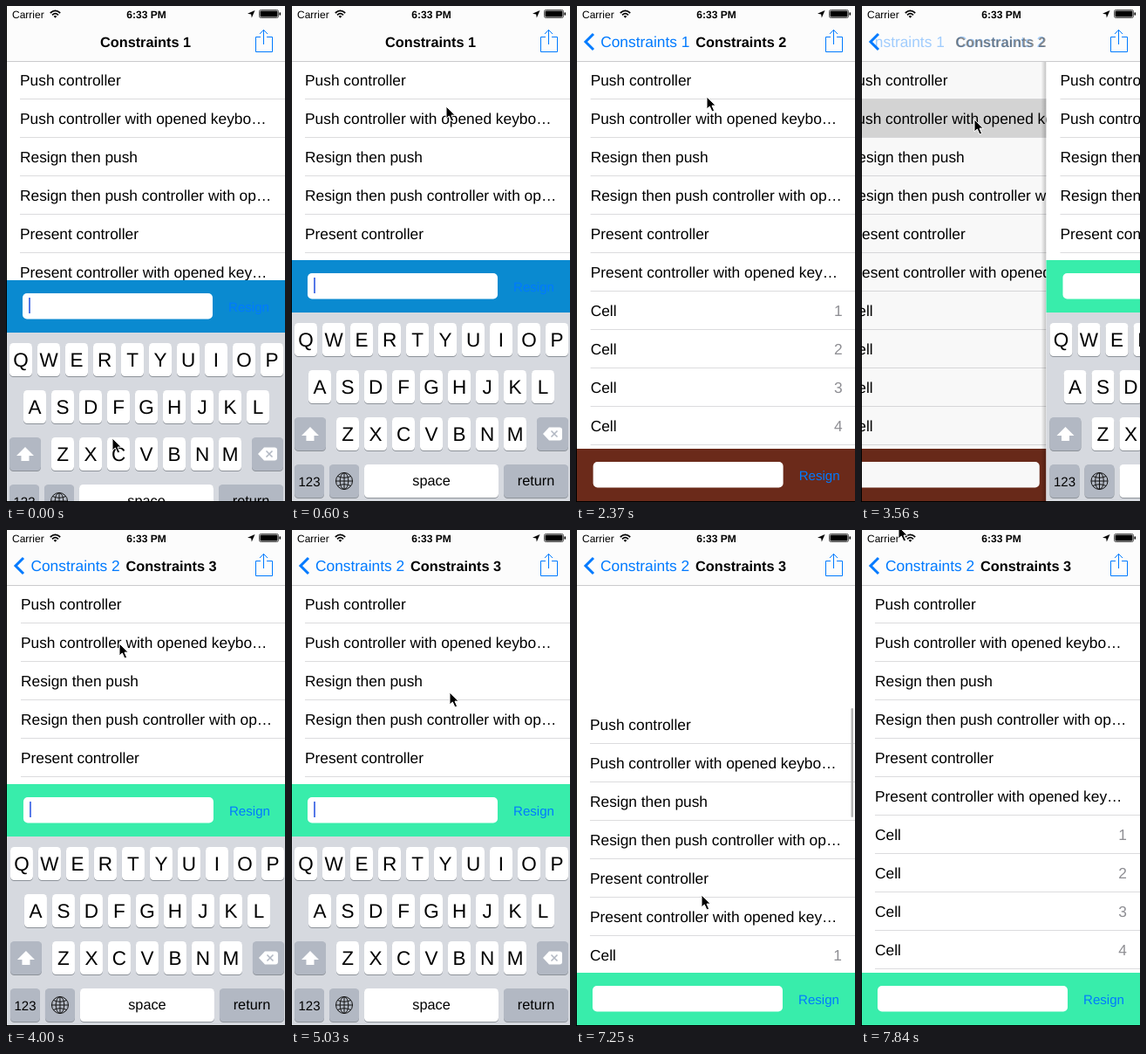
Write an HTML page that moves like this. It is 320x568 px and loops after 7.99 s.

```html
<!DOCTYPE html>
<html lang="en">
<head>
<meta charset="utf-8">
<title>Keyboard and navigation</title>
<style>
  html, body { margin: 0; width: 100%; height: 100%; overflow: hidden; background: #fff; }
  svg { display: block; width: 100vw; height: 100vh; }
  text { font-family: "Liberation Sans", Arial, sans-serif; font-size: 17.35px; text-rendering: geometricPrecision; white-space: pre; }
  .title { font-size: 16.3px; font-weight: bold; }
  .status { font-size: 12px; }
  .key { font-size: 22.5px; text-anchor: middle; }
  .word { font-size: 16.3px; text-anchor: middle; }
  .blue { fill: #007aff; }
</style>
</head>
<body>
<svg id="stage" viewBox="0 0 320 568">
  <defs>
    <linearGradient id="edge">
      <stop offset="0" stop-color="#000" stop-opacity="0"/>
      <stop offset="1" stop-color="#000" stop-opacity=".22"/>
    </linearGradient>
    <clipPath id="backClip"><rect x="16" y="22" width="304" height="40"/></clipPath>
  </defs>
</svg>
<script>
const LOOP = 7990, TICK = 147.88, LAST = 53;
const W = 320, BLUE = '#007aff';
const stage = document.getElementById('stage');

function el(tag, attrs, parent = stage, text) {
  const node = document.createElementNS('http://www.w3.org/2000/svg', tag);
  for (const k in attrs) node.setAttribute(k, attrs[k]);
  if (text !== undefined) node.textContent = text;
  parent.appendChild(node);
  return node;
}
const group = (parent, attrs = {}) => el('g', attrs, parent);
const rect = (parent, x, y, width, height, fill, rx = 0) =>
  el('rect', { x, y, width, height, fill, rx }, parent);
const label = (parent, x, y, text, attrs = {}) => el('text', { x, y, ...attrs }, parent, text);
const path = (parent, d, attrs) => el('path', { d, ...attrs }, parent);
const move = (node, x, y = 0) => node.setAttribute('transform', `translate(${x} ${y})`);
const fade = (node, a) => node.setAttribute('opacity', Math.max(0, Math.min(1, a)));
const show = (node, on) => node.setAttribute('visibility', on ? 'visible' : 'hidden');
// Lets a part inherit the visibility of its screen
const follow = (node, on) => node.setAttribute('visibility', on ? 'inherit' : 'hidden');

// Motion tracks, keyed in ticks: [tick, value, ...]
const pointer = [
  [0, 122, 495], [1, 125, 478], [2, 140, 385], [3, 160, 250], [4, 178, 115], [5, 184, 56],
  [6, 187, 85], [14, 187, 85], [18, 113, 123], [19, 130, 130], [27, 130, 130],
  [31, 160, 157], [34, 182, 186], [39, 172, 242], [40, 168, 285], [41, 160, 390],
  [42, 152, 473], [43, 150, 515], [44, 150, 527], [48, 150, 527], [49, 144, 418],
  [50, 128, 275], [51, 98, 135], [52, 64, 35], [53, 43, -4]
];
const firstPush = [[11, 0], [12, .0001], [13, .42], [14, .82], [15, .96], [16, .998], [17, 1]];
const secondPush = [[23, 0], [24, .336], [25, .78], [26, .95], [27, .997], [28, 1]];
const rise = [[0, 23], [1, 6], [2, 1], [3, 0]];
const dismiss = [[40, 0], [41, 25], [42, 107], [43, 185], [44, 216]];
const pull = [
  [39, 0], [40, 22], [41, 68], [42, 104], [43, 140], [44, 158], [48, 158],
  [49, 138], [50, 52], [51, 14], [52, 3], [53, 0]
];

function at(track, i) {
  const n = track.findIndex(k => k[0] >= i);
  if (n === 0) return track[0].slice(1);
  if (n < 0) return track[track.length - 1].slice(1);
  const a = track[n - 1], b = track[n], f = (i - a[0]) / (b[0] - a[0]);
  return a.slice(1).map((v, k) => v + (b[k + 1] - v) * f);
}

const NAMES = [
  'Push controller', 'Push controller with opened keybo…', 'Resign then push',
  'Resign then push controller with op…', 'Present controller',
  'Present controller with opened key…'
];
const FIELD_H = 29.5;

function makeScreen(color, pressed) {
  const root = group(stage);
  const shadow = rect(root, -6, 0, 6, 568, 'url(#edge)');
  rect(root, 0, 0, W, 568, '#fff');
  const list = group(root);
  const press = rect(list, 0, 63 + 44 * pressed, W, 44, '#d9d9d9');
  for (let r = 0; r < 11; r++) {
    const y = 91 + 44 * r;
    label(list, 16, y, NAMES[r] || 'Cell');
    if (r > 5) label(list, 305, y, r - 5, { 'text-anchor': 'end', fill: '#8e8e93' });
    rect(list, 16, y + 15, W - 16, 1, '#dcdcde');
  }
  const scroller = rect(root, 315.5, 66, 2.5, 6, '#b4b4b4', 1.2);
  const bar = group(root);
  rect(bar, 0, 0, W, 60, color);
  const field = rect(bar, 19, 15, 218, FIELD_H, '#fff', 5);
  const content = group(bar);
  label(content, 255, 35.5, 'Resign', { class: 'blue', style: 'font-size:15.1px' });
  const caret = rect(content, 26, 20, 2, 18, '#5578e8');
  const dim = rect(root, 0, 0, W, 568, '#000');
  show(press, false);
  show(scroller, false);
  show(caret, false);
  fade(dim, 0);
  return { root, shadow, list, press, scroller, bar, field, content, caret, dim };
}

function makeKeyboard() {
  const root = group(stage);
  rect(root, 0, 0, W, 220, '#d6d9df');
  const cap = (x, y, w, fill = '#fff') => {
    rect(root, x, y + 1, w, 38, '#8d9299', 4.5);
    rect(root, x, y, w, 38, fill, 4.5);
  };
  const GREY = '#b2b8c3';
  [['QWERTYUIOP', 17], ['ASDFGHJKL', 33], ['ZXCVBNM', 65]].forEach(([letters, x0], r) => {
    [...letters].forEach((c, k) => {
      const x = x0 + 32 * k, y = 12 + 54 * r;
      cap(x - 13, y, 26);
      label(root, x, y + 27.3, c, { class: 'key' });
    });
  });
  cap(4, 120, 36, GREY);
  path(root, 'M22 131 L32 141 H26.5 V147 H17.5 V141 H12Z', { fill: '#fff' });
  cap(282, 120, 36, GREY);
  path(root, 'M289 139 L296 131.5 H308 Q311 131.5 311 134.5 V143.5 Q311 146.5 308 146.5 H296Z', { fill: '#fff' });
  path(root, 'M298.5 135.5 L305.5 142.5 M305.5 135.5 L298.5 142.5', { stroke: GREY, 'stroke-width': 1.6 });
  cap(4, 174, 34, GREY);
  label(root, 21, 199, '123', { class: 'word', style: 'font-size:15px' });
  cap(44, 174, 34, GREY);
  const globe = group(root, { fill: 'none', stroke: '#111', 'stroke-width': 1 });
  el('circle', { cx: 61, cy: 193, r: 9.5 }, globe);
  el('ellipse', { cx: 61, cy: 193, rx: 4.8, ry: 9.5 }, globe);
  path(globe, 'M61 183.5 V202.5 M51.5 193 H70.5 M53.5 187.5 Q61 191 68.5 187.5 M53.5 198.5 Q61 195 68.5 198.5', {});
  cap(84, 174, 154);
  label(root, 161, 197.6, 'space', { class: 'word' });
  cap(244, 174, 74, GREY);
  label(root, 281, 197.6, 'return', { class: 'word' });
  return root;
}

const screens = [makeScreen('#0a8ad0', 0), makeScreen('#6b2a1a', 1), makeScreen('#38edab', 0)];
const keyboard = makeKeyboard();

const nav = group(stage);
rect(nav, 0, 0, W, 63, '#fcfcfc');
rect(nav, 0, 63, W, 1, '#cbcbcd');
const backs = group(nav, { 'clip-path': 'url(#backClip)' });
const titles = [1, 2, 3].map(n => label(nav, 0, 47, 'Constraints ' + n, { class: 'title' }));
const links = [1, 2].map(n => label(backs, 0, 47, 'Constraints ' + n, { class: 'blue' }));
const chevron = path(nav, 'M20 32 L11 41 L20 50', { fill: 'none', stroke: BLUE, 'stroke-width': 3 });
path(nav, 'M292 35.5 H286.5 V52.5 H305.5 V35.5 H299 M295.5 44 V27.5 M291 32 L295.5 27.3 L300 32',
  { fill: 'none', stroke: BLUE, 'stroke-width': 1 });

label(nav, 7, 13.5, 'Carrier', { class: 'status' });
label(nav, 161, 13.5, '6:33 PM', { class: 'status', 'text-anchor': 'middle', 'font-weight': 'bold' });
path(nav, 'M50.8 8 Q56.5 2.8 62.2 8 M53 10.3 Q56.5 7 60 10.3', { fill: 'none', stroke: '#000', 'stroke-width': 1.7 });
path(nav, 'M54.6 11.8 Q56.5 10.2 58.4 11.8 L56.5 13.8Z', {});
path(nav, 'M285.5 5 L281.8 13.5 L281.2 9.4 L277 8.8Z', {});
rect(nav, 290.5, 4.5, 22, 9, '#fff', 1.8).setAttribute('stroke', '#555');
rect(nav, 291.5, 5.5, 20, 7, '#000', 1);
rect(nav, 313.5, 7.3, 1.5, 3.4, '#000', .7);

const arrow = path(stage, 'M0 0 V14 L3.3 11 L6 17 L8.6 15.9 L6 10.1 H10.3Z',
  { stroke: '#fff', 'stroke-width': 1, 'stroke-linejoin': 'round' });
rect(stage, 0, 0, 1, 568, '#000');
rect(stage, 0, 567, W, 1, '#000');

// Slides one screen under the next one.
function push(from, to, p) {
  move(from.root, -96 * p);
  fade(from.dim, .08 * p);
  show(from.root, p < 1);
  move(to.root, W * (1 - p));
  show(to.root, p > 0);
  show(to.shadow, p > 0 && p < 1);
}

function drawNav(p1, p2) {
  const q1 = p1 ** 1.22, q2 = p2 ** 1.22;
  const enter = p => (p - .4) / .6;
  const place = (node, x, a) => { move(node, x); fade(node, a); };
  place(titles[0], 108 - 80 * q1, 1 - p1 * 1.7);
  place(links[0], 28 + 80 * (1 - q1) - 130 * q2, p2 > 0 ? 1 - p2 * 1.9 : p1);
  place(titles[1], 137 + 130 * (1 - q1) - 109 * q2, p2 > 0 ? 1 - p2 * 1.7 : enter(p1));
  place(links[1], 28 + 110 * (1 - q2), p2);
  place(titles[2], 137 + 130 * (1 - q2), enter(p2));
  fade(chevron, p1);
}

function draw(i) {
  const [p1] = at(firstPush, i), [p2] = at(secondPush, i);
  const [up] = at(rise, i), [down] = at(dismiss, i), [drag] = at(pull, i);
  const [a, b, c] = screens;

  push(a, b, p1);
  push(b, c, p2);
  show(b.root, p1 > 0 && p2 < 1);
  if (p2 === 0) move(b.root, W * (1 - p1));

  follow(a.press, i >= 11);
  follow(b.press, i >= 24);
  follow(a.caret, i < 5 || (i >= 8 && i < 12));
  follow(c.caret, i >= 27 && i < 44 && (i - 27) % 6.8 < 3.4);

  move(a.bar, 0, 291 + up);
  move(b.bar, 0, 507);
  move(c.bar, 0, 291 + down);
  move(c.list, 0, drag);

  // The bar's content smears downwards with the drag speed
  const smear = .1 * (down - at(dismiss, i - 1)[0]);
  move(c.content, 0, smear);
  c.field.setAttribute('height', FIELD_H + smear);

  const bouncing = i >= 49;
  follow(c.scroller, i >= 40 && i < LAST);
  c.scroller.setAttribute('y', bouncing ? 66 + drag : 65.5);
  c.scroller.setAttribute('height', bouncing ? 125 : Math.max(6, 110 - drag));

  const second = p2 > 0;
  move(keyboard, second ? W * (1 - p2) : -W * p1, 351 + (second ? down : up));
  show(keyboard, p1 < 1 || second);
  drawNav(p1, p2);
  move(arrow, ...at(pointer, i));
}

const start = performance.now();
function run() {
  const t = (performance.now() - start) % LOOP;
  draw(Math.min(LAST, Math.floor(t / TICK)));
  requestAnimationFrame(run);
}
run();
</script>
</body>
</html>
```
